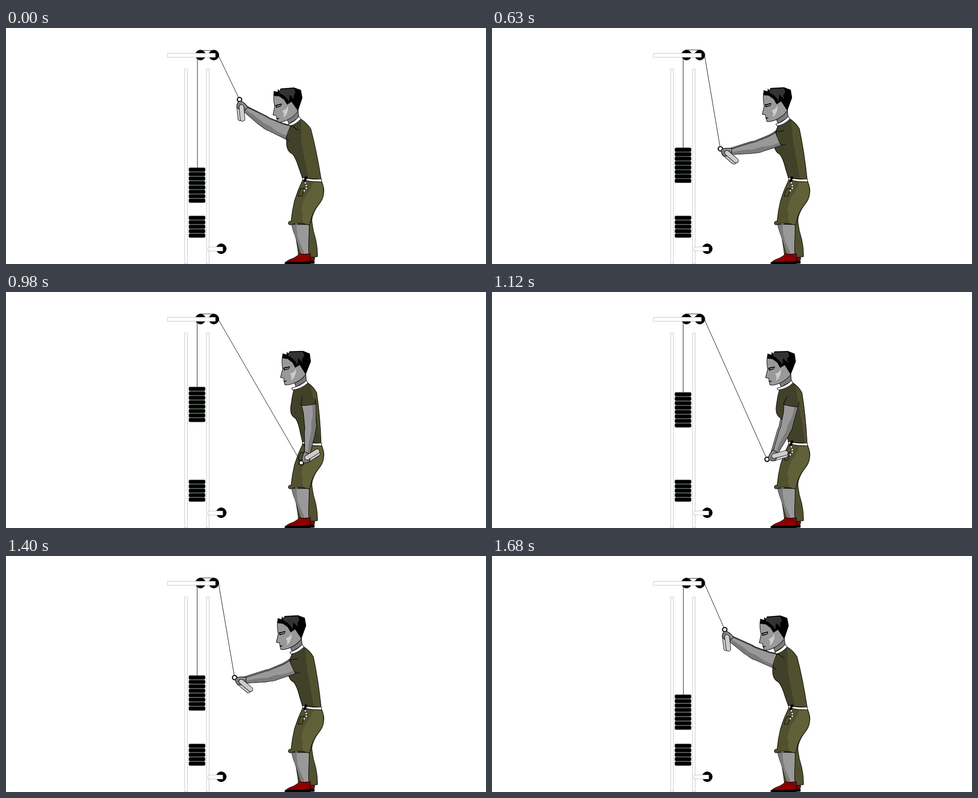
An HTML page with a canvas for the animation above (2.1 s loop, 970 by 480 pixels).

```html
<!DOCTYPE html>
<html lang="en">
<head>
<meta charset="utf-8">
<title>Cable pulldown</title>
<style>
html, body { margin: 0; width: 100%; height: 100%; overflow: hidden; background: #fff; }
canvas { display: block; }
</style>
</head>
<body>
<canvas id="stage" width="970" height="480"></canvas>
<script>
const ctx = document.getElementById('stage').getContext('2d');
const LOOP = 2100, STEP = 70, HOLD = 420;
const SKIN = '#999', SKIN_DARK = '#7b7b7b', SHINE = '#ccc';
const CLOTH = '#51512f', CLOTH_DARK = '#41412a', CLOTH_LIGHT = '#616139';

// Poses along the pull: progress, body lean, arm angle, shoulder x and y.
const POSES = [
  [0, 0, -30, 588.3, 222],
  [.111, 3.3, -20.3, 592.8, 222.5],
  [.446, 8, 14, 598.4, 220.2],
  [.778, 13.5, 54.5, 609.8, 217],
  [.879, 16, 70.2, 610.4, 212.2],
  [1, 18.3, 87, 612, 209]
];

function slope(i, c) {
  const a = POSES[Math.max(i - 1, 0)], b = POSES[Math.min(i + 1, POSES.length - 1)];
  return (b[c] - a[c]) / (b[0] - a[0]);
}

function poseAt(p) {
  let i = 0;
  while (i < POSES.length - 2 && p > POSES[i + 1][0]) i++;
  const a = POSES[i], b = POSES[i + 1], h = b[0] - a[0];
  const s = (p - a[0]) / h, r = 1 - s;
  const [lean, degrees, x, y] = [1, 2, 3, 4].map(c =>
    r * r * (1 + 2 * s) * a[c] + s * s * (3 - 2 * s) * b[c] +
    h * s * r * (r * slope(i, c) - s * slope(i + 1, c)));
  return { p, lean, angle: degrees * Math.PI / 180, x, y };
}

function progressAt(time) {
  if (time < HOLD) return 0;
  const k = Math.min(19, Math.floor((time - HOLD) / STEP) + 1);
  return k < 10 ? k / 9 : .879 - (k - 11) * .107;
}

function shape(d, fill, stroke = '#000', width = 1) {
  const path = new Path2D(d);
  if (fill) { ctx.fillStyle = fill; ctx.fill(path); }
  if (stroke) { ctx.strokeStyle = stroke; ctx.lineWidth = width; ctx.stroke(path); }
}

function disc(x, y, r, fill, stroke, width = 1) {
  ctx.beginPath();
  ctx.arc(x, y, r, 0, Math.PI * 2);
  ctx.fillStyle = fill;
  ctx.fill();
  if (stroke) { ctx.strokeStyle = stroke; ctx.lineWidth = width; ctx.stroke(); }
}

function beam(x, y, w, h) {
  ctx.fillStyle = '#fff';
  ctx.fillRect(x, y, w, h);
  ctx.strokeStyle = '#c4c4c4';
  ctx.lineWidth = 1;
  ctx.strokeRect(x, y, w, h);
}

function pulley(x, y) {
  disc(x, y, 10.3, '#000', '#26332b');
}

function plates(top, count) {
  for (let i = 0; i < count; i++) {
    ctx.beginPath();
    ctx.roundRect(369.7, top + i * 9 + .3, 32.6, 7.8, 2);
    ctx.fillStyle = '#000';
    ctx.fill();
    ctx.strokeStyle = '#303a30';
    ctx.lineWidth = 1;
    ctx.stroke();
  }
}

function within(transform, draw) {
  ctx.save();
  ctx.transform(...transform);
  draw();
  ctx.restore();
}

function machine(p) {
  const weight = 284 - 91 * p;
  const slack = Math.max(0, 1 - 9 * p);
  beam(361.5, 83.5, 5, 396);
  beam(405.5, 83.5, 5, 396);
  pulley(393, 55);
  pulley(420, 55);
  const cableX = 386.3 + .6 * slack;
  shape(`M${cableX} 60V${weight}`, null, '#111');
  shape(`M391 ${44.6 + slack}H421`, null, '#26332b');
  beam(326.5, 51.5, 96.5, 8);
  pulley(435, 449);
  beam(408.5, 445.5, 29.5, 8);
  plates(weight, 8);
  plates(382, 5);
}

function legs() {
  shape('M642 325Q644 340 634 355Q618 378 618 392Q620 412 626 430Q630 448 629.5 465L615 467L591 461Q588 435 584 420L610 330Z', CLOTH);
  shape('M615 466L624 467L622.5 474H615Z', '#8b0000');
  shape('M615 474H623V479H615Z', '#000');
  shape('M577 400Q580 412 586 428Q592 444 596 460H612Q611 446 612 430L613 400Z', SKIN);
  shape('M577 400L587 401Q588 422 593 435L604 460H596Q591 443 585 426Z', SKIN_DARK, null);
  shape('M565 476Q571 471 581 468Q589 464 593 459Q604 462 615 459V476Z', '#8b0000');
  shape('M564 477L615 475V480H564Z', '#000');

  shape('M600 308Q590 328 583 351Q578 372 576 393Q571 392 570.5 397Q571 401 576 400Q594 394 613 401Q617 391 618 384Q624 368 636 354Q643 343 642 330Q642 320 638 312Z', CLOTH);
  shape('M637 313L621 315Q616 328 608 339Q599 352 597 372Q602 379 598 387L601 397L613 400Q615 381 624 367L636 350Q642 340 641 327Z', CLOTH_LIGHT, null);
  shape('M595.5 327L602.5 326L598.5 342H590.5Z', null);
}

function belt() {
  shape('M599 304L600 309Q618 313 638 313L637 307Q617 309 599 304Z', '#fff');
  shape('M604 302H609L606 313H601Z', '#000', null);
  for (const [x, y] of [[605, 315], [607, 320.5], [607, 326], [603, 331]])
    disc(x, y, 2.4, '#ddd', '#111', .9);
}

function head() {
  shape('M567 184L572 195L592 182L590 167Z', SKIN_DARK);
  shape('M541 134Q540 147 543 160L539.5 177L546 178L547 184L549 191Q553 193 564 189Q580 183 590 169L585 145L560 134Z', SKIN);
  shape('M569 154Q571 164 558 169Q563 171 561 183Q570 174 570 163Z', SHINE, null);
  shape('M544 157L557.5 153.5L556 159L546 162.5Z', '#000', null);
  shape('M547 159.3L555 157', null, '#eee', 1.2);
  shape('M546.5 183.5L553 183L549 186Z', '#000', null);
  shape('M541 128L549 130L549.5 124L552.5 128L555 123L582 121L596 126L599 142L590 169L577 150L568 156L562 146L552 139L541 138Z', '#000', null);
  shape('M555 125L582 123L585 131L581 138L583 145L573 136L572 150Q566 138 552 132Z', '#333', null);
}

function torso(p) {
  const throat = 576 - 7 * p;
  const outline = `M594 184Q608 192 616 205Q628 250 637 308L599 305Q592 286 589 276Q583 260 578 256Q565 250 567 227Q567 212 ${throat} 198Z`;
  shape(outline, CLOTH, null);
  ctx.save();
  ctx.clip(new Path2D(outline));
  shape(`M555 180L${596 + 4 * p} 183L${597 + 17 * p} 230L${604 + 22 * p} 270L${612 + 24 * p} 308H555Z`, CLOTH_DARK, null);
  ctx.restore();
  shape(outline, null);
  shape(`M${throat - 5} 195.5Q583 191 592 180L596 185Q586 196 ${throat - 2} 199.5Z`, '#fff');
}

function armShape() {
  shape('M0 -15Q8 -11 18 -9L48 -4.5L55 -5L102 -2L101 8.5L60 16.5L53 17Q43 19.5 36 17.5L-2 15Z', SKIN);
}

function handle(u, v) {
  const line = `M${108 + u} ${3 + v}L${94 + u} ${23 + v}`;
  shape(line, null, '#000', 10.4);
  shape(line, null, SHINE, 8.6);
}

function nearArm() {
  armShape();
  shape('M0 8Q20 12 36 8L54 9Q78 4 100 4L101 8L60 16L53 16.5Q43 19 36 17L-1 14.5Z', SKIN_DARK, null);
  shape('M5 -15Q-1 -3 -1 15L-13 14L-16 -12Z', CLOTH_DARK, null);
  shape('M-15 -13L2 -15Q3 0 -3 15L-11 14', null);
  handle(4.6, 1.5);
  shape('M96 -3Q110 -9 117 -6Q121 -1 117 7Q112 11 100 9Z', SKIN_DARK);
  shape('M98 -1L111 -4', null, SKIN, 2);
  handle(0, 0);
}

function draw(time) {
  const { p, lean, angle, x, y } = poseAt(progressAt(time));
  const shear = lean / 157, nod = lean * .0025, headShear = lean * .003;
  const cos = Math.cos(angle), sin = Math.sin(angle);
  const cuffX = x - 20 * cos, cuffY = y + 20 * sin;
  // Local axes: along the arm, then toward its underside.
  const arm = [-cos, sin, sin, cos, cuffX, cuffY];
  const ringX = cuffX - 119 * cos - 8 * sin;
  const ringY = cuffY + 119 * sin - 8 * cos;

  ctx.clearRect(0, 0, 970, 480);
  ctx.lineJoin = 'round';
  ctx.lineCap = 'round';
  machine(p);
  within(arm, () => {
    ctx.translate(0, -1.5 - 2 * p);
    armShape();
  });
  legs();
  within([1, nod, -headShear, 1, 1.36 * lean, -610 * nod], head);
  within([1, 0, -shear, 1, 307 * shear, 0], () => torso(p));
  belt();
  shape(`M429.8 57L${ringX} ${ringY}`, null, '#111');
  disc(ringX, ringY, 4.4, '#fff', '#000', 2.2);
  within(arm, nearArm);
}

function tick(now) {
  draw(now % LOOP);
  requestAnimationFrame(tick);
}
draw(0);
requestAnimationFrame(tick);
</script>
</body>
</html>
```
